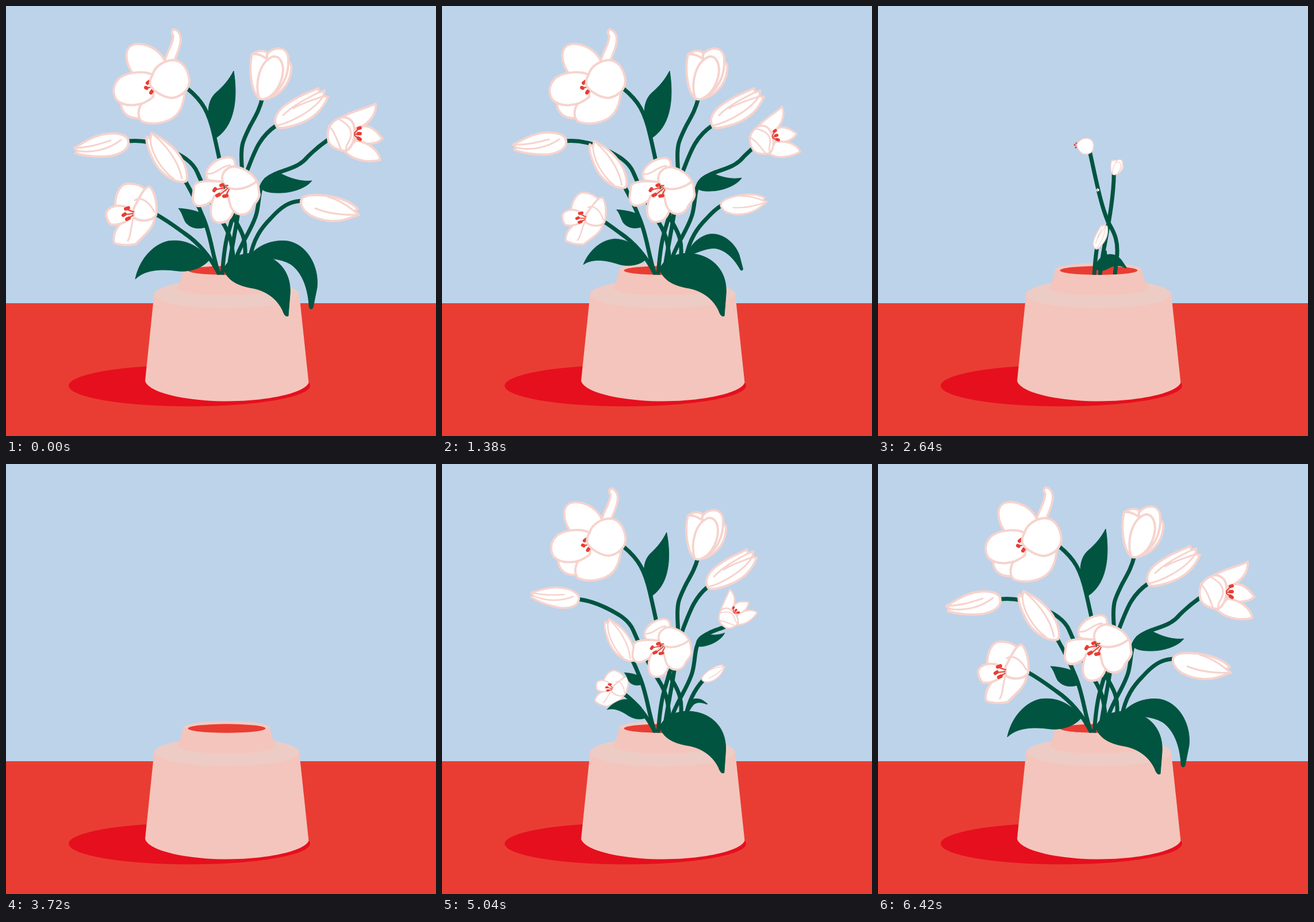
An HTML page that plays this animation: 748x748 px, repeating every 7.68 s.

```html
<!DOCTYPE html>
<html lang="en">
<head>
<meta charset="utf-8">
<title>Vase of flowers</title>
<style>
  html, body { margin: 0; width: 100%; height: 100%; overflow: hidden; background: #bdd3ea; }
  svg { display: block; width: 100%; height: 100%; }
  .stem { fill: none; stroke: #005440; stroke-width: 7; }
  .leaf { fill: #005440; stroke: #005440; stroke-width: 1; stroke-linejoin: round; }
  .head path { fill: #fff; stroke: #f6d3cd; stroke-width: 4; stroke-linejoin: round; stroke-linecap: round; }
  .head .line { fill: none; stroke-width: 3; }
  .head .thread { fill: none; stroke: #e93d33; stroke-width: 2; }
  .head .dot { fill: none; stroke: #e93d33; stroke-width: 6; }
</style>
</head>
<body>
<!-- data-t: start step, end step, starting turn in degrees; data-at: anchor point -->
<svg viewBox="0 0 748 748">
  <clipPath id="above"><path d="M0 0H748V460H451.5A67.5 7.7 0 0 1 316.500 460H0Z"/></clipPath>
  <path fill="#bdd3ea" d="M0 0H748V748H0Z"/>
  <path fill="#e93d33" d="M0 517H748V748H0Z"/>
  <ellipse cx="319" cy="660.500" rx="210" ry="36" fill="#e60f1e"/>
  <path fill="#f4c5bc" d="M258 498L242 652C247 673 315 687.500 385 687.500C455 687.500 521 673 526.500 655L510 500Z"/>
  <ellipse cx="384" cy="501" rx="126" ry="25" fill="#edccc6"/>
  <path fill="#f4c5bc" d="M308 459C310 443 457 443 459 459C461 472 466 482 470 490C468 508 300 508 298 490C303 480 306 472 308 459Z"/>
  <path fill="#edccc6" d="M308 459C310 443 457 443 459 459Z"/>
  <ellipse cx="384" cy="460" rx="67.500" ry="7.700" fill="#e93d33"/>

  <g clip-path="url(#above)">
    <g>
      <path class="stem" data-t="7.5 35" d="M396 442C393 415 392 400 376 375C360 350 346 320 333 290C325 270 305 260 285 250C260 238 240 233 214 235"/>
      <g class="head" data-t="7.3 38 130" data-at="214 235">
        <path d="M213 237C213 223 192 219 170 223C150 227 135 237 119 247L124 252L121 256C140 262 160 263 182 261C203 257 214 247 213 237Z"/>
        <path class="line" d="M119 247C145 246 160 241 182 234M124 252C150 256 178 250 200 233"/>
      </g>
    </g>
    <g>
      <path class="stem" data-t="16.5 44" d="M371 467C355 435 335 412 310 395C292 382 280 373 262 363"/>
      <g class="head" data-t="15 45 55" data-at="262 363">
        <path d="M190 350C189 325 200 309 212 309C228 309 241 314 245 325L230 358H195Z"/>
        <path d="M188 412C185 395 193 380 218 362L258 370C257 388 236 402 226 414C212 417 198 416 188 412Z"/>
        <path d="M174 360C178 349 193 345 207 349L222 360C214 374 198 383 182 380C176 374 174 367 174 360Z"/>
        <path d="M222 352C232 334 240 314 250 314C260 325 264 348 261 364C252 376 232 375 222 368Z"/>
        <path class="line" d="M224 338C235 330 250 342 258 358M222 368C216 385 218 400 212 408"/>
        <path class="thread" d="M222 358L210 354M221 361L206 363M221 364L212 370"/>
        <path class="dot" d="M208 353L213 351M204 364L207 362M210 371L214 369"/>
      </g>
    </g>
    <g>
      <path class="stem" data-t="1 25.5" d="M412 468L415 442C420 405 408 390 400 375C385 340 375 280 362 225C353 185 342 165 316 144"/>
      <g class="head" data-t="3.5 30 45" data-at="317 145">
        <g data-t="7 20" data-at="275 135">
          <path d="M276 96C281 77 290 68 291 52C287 47 288 40 294 41C302 44 306 54 303 66C301 78 296 85 293 96Z"/>
          <path d="M224 122C206 100 202 69 227 66C250 65 270 80 277 97L262 128Z"/>
          <path d="M200 168C200 185 212 197 234 195L245 168Z"/>
          <path d="M246 162C228 170 227 195 237 201C255 208 284 204 298 188C306 178 310 165 311 148L265 140Z"/>
          <path d="M256 158C235 177 205 176 192 163C184 150 186 135 199 124C215 114 243 112 258 121Z"/>
        </g>
        <path class="thread" d="M258 139L249 133M258 141L245 142M258 144L253 149"/>
        <path class="dot" d="M246 134L250 131M243 142L245 143M252 151L254 148"/>
        <path d="M255 120C258 105 275 95 290 94C308 95 316 110 319 128C320 145 306 157 290 160C275 160 256 148 251 138C250 130 251 125 255 120Z"/>
      </g>
    </g>
    <g>
      <path class="stem" data-t="1.2 29.5" d="M386 468L389 446C397 395 413 330 410 275C408 240 412 235 425 208C435 190 441 180 446 160"/>
      <g class="head" data-t="5 31 5" data-at="446 162">
        <path d="M482 94C494 95 498 102 496 112C494 137 474 158 450 162Z"/>
        <path d="M428 84C440 75 454 76 462 88L450 130Z"/>
        <path d="M454 84C464 71 488 68 491 90C493 118 482 148 452 161Z"/>
        <path d="M428 84C422 108 426 150 441 161L460 140L462 100C452 88 438 82 428 84Z"/>
        <path d="M440 160C433 135 440 98 464 88C476 86 482 98 482 113C480 135 468 155 452 161C447 163 443 163 440 160Z"/>
      </g>
    </g>
    <g>
      <path class="stem" data-t="6.6 31" d="M376 468C378 440 380 420 385 400C395 365 408 320 420 285C432 255 440 228 470 208"/>
      <g class="head" data-t="3 32 -62" data-at="468 209">
        <path d="M471 210C465 200 468 186 485 173C505 158 525 151 543 143L545 150L554 147L552 157L560 158C550 183 530 200 500 208C486 212 476 214 471 210Z"/>
        <path class="line" d="M482 190C500 172 525 160 545 150M471 208C490 204 532 186 552 157C530 165 512 170 500 178"/>
      </g>
    </g>
    <g>
      <path class="stem" data-t="14.4 41" d="M401 437C410 410 430 385 436 360C442 335 438 318 452 302C475 283 505 287 525 262C540 247 548 241 561 232"/>
      <g class="head" data-t="14.2 45 -125" data-at="560 233">
        <path d="M578 198C595 184 625 179 643 170C645 186 635 202 612 214L590 225Z"/>
        <path d="M608 213C628 203 641 212 655 231C645 240 628 242 612 237Z"/>
        <path d="M592 250L608 234C632 237 649 252 651 268C632 272 606 271 588 252Z"/>
        <path d="M561 236C556 215 563 203 578 196C590 190 604 196 606 212C608 230 603 245 592 252C580 252 565 246 561 236Z"/>
        <path class="line" d="M578 196C592 204 602 212 600 226C598 238 590 240 592 252M561 208C570 216 576 232 582 248"/>
        <path class="thread" d="M606 221L614 213M606 223H614M606 225L614 231"/>
        <path class="dot" d="M613 213L616 212M613 222H616M613 230L616 232"/>
      </g>
    </g>
    <g>
      <path class="stem" data-t="17 46" d="M424 440C430 405 445 385 460 370C478 350 492 340 513 339"/>
      <g class="head" data-t="18 46 -80" data-at="511 340">
        <path d="M513 342C512 331 525 328 545 329C575 330 600 340 612 353L606 357L614 363C600 367 590 375 565 374C540 372 515 361 513 342Z"/>
        <path class="line" d="M560 332C580 337 595 348 606 357M538 352C560 361 588 364 614 363"/>
      </g>
    </g>
    <g>
      <path class="stem" data-t="12 41" d="M371 468C359 435 357 400 343 368C333 343 322 322 311 303"/>
      <g class="head" data-t="9.5 41 30" data-at="312 306">
        <path d="M313 305C300 309 275 299 260 275C250 257 242 236 245 227L251 231L253 221C275 231 296 247 308 270C315 286 317 300 313 305Z"/>
        <path class="line" d="M251 231C252 255 270 285 292 301M253 221C275 238 300 268 306 300"/>
      </g>
    </g>
    <g class="head" data-t="7.5 37.7 0" data-at="382 320">
      <path d="M352 303C340 288 360 266 385 263C400 262 400 275 397 288L378 306Z"/>
      <path class="line" d="M350 292C366 293 374 278 390 277"/>
      <path d="M376 306C352 303 326 304 327 316C326 328 320 343 334 348C350 349 362 336 376 324Z"/>
      <path d="M362 331C352 355 355 375 370 377C388 378 396 364 398 345L385 318Z"/>
      <path d="M386 310L430 300C442 306 438 318 441 328C440 340 430 344 428 352C420 366 402 366 394 354C386 345 390 330 382 320Z"/>
      <path d="M376 300C376 286 390 277 402 280C419 284 432 295 436 305C420 318 398 322 385 315C378 310 376 306 376 300Z"/>
      <path class="thread" d="M386 312L375 313M384 315L363 320M386 317L370 330M388 319L382 331"/>
      <path class="dot" d="M374 312L377 311M362 321L364 318M367 330L371 328M379 331L384 330"/>
    </g>
  </g>

  <path class="leaf" data-t="10.5 31 -30" data-at="364 229" d="M396 113C402 150 402 205 366 229C350 205 346 170 364 152C380 138 388 128 396 113Z"/>
  <path class="leaf" data-t="17 38 0" data-at="347 382" d="M300 352C315 353 335 356 344 364L349 384C335 389 322 387 313 377C308 369 307 360 300 352Z"/>
  <path class="leaf" data-t="17 40 -40" data-at="442 315" d="M442 313C447 299 460 291 475 290C495 301 515 306 532 304C522 317 495 326 472 325C455 325 443 321 442 313Z"/>
  <path class="leaf" data-t="17 45 55" data-at="354 442" d="M354 441C330 411 305 406 282 409C252 416 231 445 225 475C240 460 265 456 300 461C325 463 345 453 354 441Z"/>
  <path class="leaf" data-t="20.6 46 -87" data-at="428 431" d="M424 434C440 415 465 406 490 409C525 415 545 455 541 490L534 525C530 529 527 527 527 520C525 490 515 463 495 449C475 437 450 440 424 434Z"/>
  <path class="leaf" data-t="4.5 28 -64" data-at="380 458" d="M379 458C384 440 410 427 437 431C475 436 497 465 494 502L491 539C486 541 484 537 481 529C470 507 450 495 430 491C405 487 385 478 379 458Z"/>
</svg>
<script>
const LOOP = 7680, STEP = 60, EMPTY_MID = 56.5, FULL = 46;

const parts = [...document.querySelectorAll('[data-t]')].map(el => {
  const [start, end, turn = 0] = el.dataset.t.split(' ').map(Number);
  const part = { el, start, end, turn };
  if (el.matches('.stem')) part.length = el.getTotalLength();
  else part.at = el.dataset.at.split(' ').map(Number);
  const prev = el.previousElementSibling;
  if (el.matches('.head') && prev && prev.matches('.stem')) part.stem = prev;
  return part;
});

function pose({ el, start, end, turn, length, at, stem }, step) {
  const x = Math.min(1, Math.max(0, (step - start) / (end - start)));
  const p = 1 - (1 - x) ** 3;
  el.style.display = p ? '' : 'none';
  if (length) {
    el.grown = p * length;
    el.setAttribute('stroke-dasharray', `${el.grown} 9999`);
    return;
  }
  let [tx, ty] = at;
  if (stem) {
    const tip = stem.getPointAtLength(stem.grown);
    const base = stem.getPointAtLength(stem.getTotalLength());
    tx += tip.x - base.x;
    ty += tip.y - base.y;
  }
  el.setAttribute('transform',
    `translate(${tx} ${ty}) rotate(${turn * (1 - p)}) scale(${p}) translate(${-at[0]} ${-at[1]})`);
}

function draw(now) {
  // The bouquet shrinks away, then grows back as a mirror image in time.
  const tick = Math.floor(now % LOOP / STEP);
  const step = Math.min(FULL, Math.max(0, Math.abs(tick - EMPTY_MID) - 4.5));
  for (const part of parts) pose(part, step);
}

let first;
function loop(now) {
  first ??= now;
  draw(now - first);
  requestAnimationFrame(loop);
}
draw(0);
requestAnimationFrame(loop);
</script>
</body>
</html>
```
